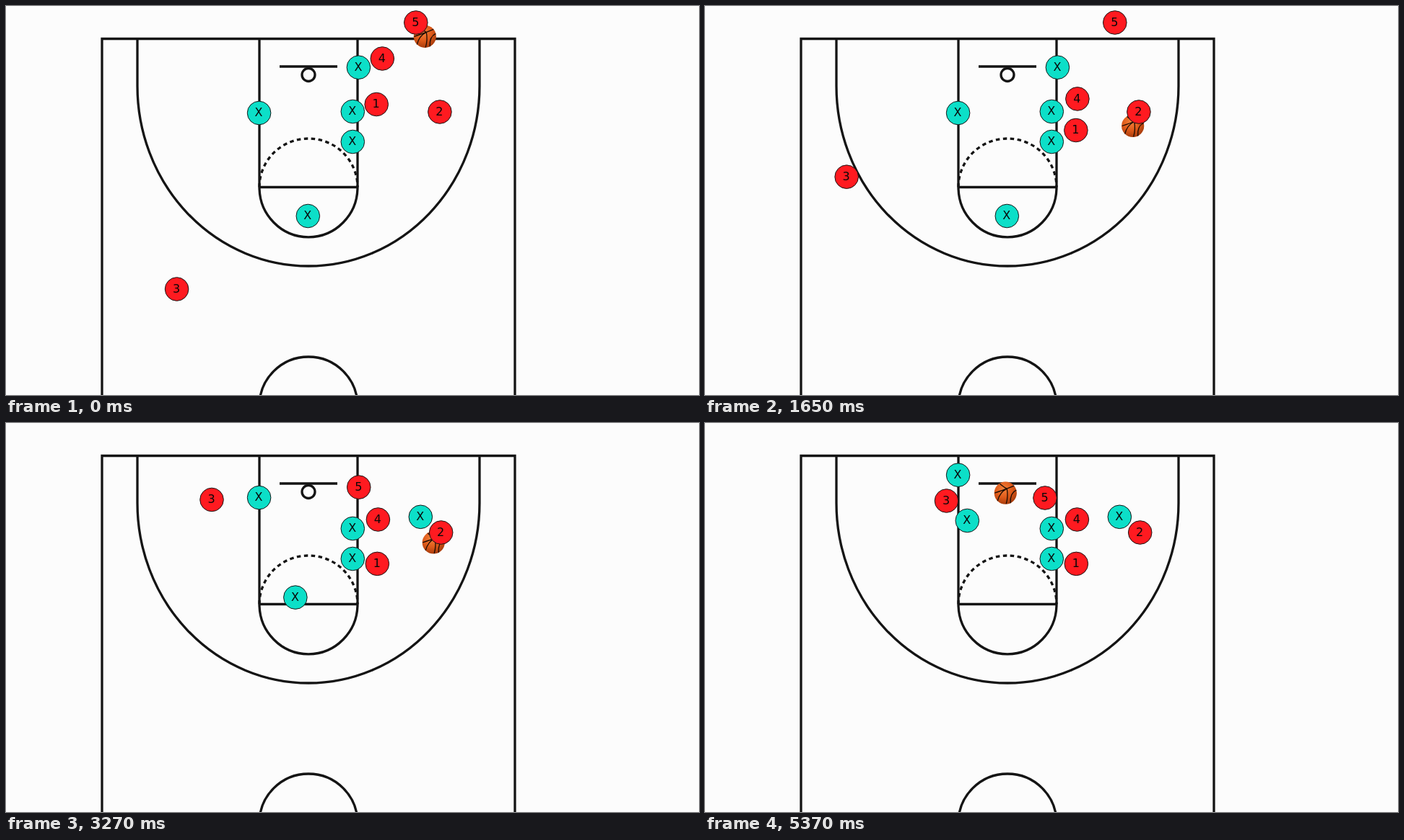
Animation, 960 px wide and 540 px high, one loop 6210 ms. Source, as an HTML page:

```html
<!DOCTYPE html>
<html lang="en">
<head>
<meta charset="utf-8">
<title>Inbound play</title>
<style>
  html, body { margin: 0; width: 100%; height: 100%; overflow: hidden; background: #fcfcfc; }
  svg { display: block; width: 960px; height: 540px; }
  .court { fill: none; stroke: #141414; stroke-width: 3.3; }
  .token { stroke: #151515; stroke-width: 1; }
  .seams { fill: none; stroke: #1c0c04; stroke-width: 1.3; }
  text { font: 16px "DejaVu Sans", Verdana, sans-serif; text-anchor: middle; fill: #080808; }
</style>
</head>
<body>
<svg viewBox="0 0 960 540">
  <defs>
    <radialGradient id="leather" cx="42%" cy="32%" r="68%">
      <stop offset="0" stop-color="#f5823a"/>
      <stop offset=".55" stop-color="#de5a1a"/>
      <stop offset="1" stop-color="#a83c0c"/>
    </radialGradient>
  </defs>
  <g class="court">
    <path d="M133 541V45.5H705V541"/>
    <path d="M182 45.5V111A237 250 0 0 0 656 111V45.5"/>
    <path d="M351 45.5V251.5A68 69.3 0 0 0 487 251.5V45.5M350 251.5H488"/>
    <path d="M351 251.5A68 67.5 0 0 1 487 251.5" stroke-dasharray="5.5 4.5"/>
    <path d="M379 84H459"/>
    <circle cx="419" cy="95.5" r="9"/>
    <circle cx="419" cy="555" r="68"/>
  </g>
  <g id="ball">
    <circle r="15.6" fill="url(#leather)"/>
    <path class="seams" d="M-15 0Q-3 -4 2 -6T12 -10M-8 -13Q-2 -8 2 -6Q4 4 1 15M2 -6Q-8 -1 -11 11M15 -4Q6 0 7 14"/>
  </g>
  <g id="players"></g>
</svg>
<script>
const LOOP = 6210, STEP = 30, LAST = 5370, BEAT = 900;
const layer = document.getElementById("players");
const movers = [];

function make(tag, attrs, parent) {
  const el = document.createElementNS("http://www.w3.org/2000/svg", tag);
  for (const key in attrs) el.setAttribute(key, attrs[key]);
  return parent.appendChild(el);
}

// Something that runs in straight lines at an even pace; durations are in beats.
class Mover {
  constructor(el, x, y) {
    this.el = el;
    this.start = { x, y };
    this.legs = [];
    movers.push(this);
  }
  run(beats, x, y) {
    this.legs.push({ beats, x, y });
    return this;
  }
  wait(beats) {
    const { x, y } = this.legs.at(-1) || this.start;
    return this.run(beats, x, y);
  }
  place(beat) {
    let { x, y } = this.start;
    for (const leg of this.legs) {
      const k = Math.min(Math.max(beat / leg.beats, 0), 1);
      x += (leg.x - x) * k;
      y += (leg.y - y) * k;
      beat -= leg.beats;
    }
    this.el.setAttribute("transform", `translate(${x} ${y})`);
  }
}

function token(label, fill, x, y) {
  const el = make("g", {}, layer);
  make("circle", { class: "token", r: 16.3, fill }, el);
  make("text", { x: -0.5, y: 4.7 }, el).textContent = label;
  return new Mover(el, x, y);
}
const attacker = (label, x, y) => token(label, "#ff1a20", x, y);
const defender = (x, y) => token("X", "#0cdfc8", x, y);

// Defence: two hold the lane, three shift across.
defender(480.3, 146.5);
defender(480.3, 188.5);
defender(488.4, 85.2).wait(2).run(1, 574.3, 130.3);
defender(418.3, 291.5).wait(3).run(2, 363.3, 135.5);
defender(350.6, 148.5).wait(2).run(2, 350.6, 93.5).run(1, 350.6, 72.2);

// Offence: 1 and 4 screen, 3 cuts along the wing, 5 steps in.
attacker("1", 513.2, 136.5).run(3, 514.3, 195.4);
attacker("2", 600.9, 147).wait(2).run(1, 602.7, 152);
attacker("3", 236.6, 393).run(2, 192.5, 223).run(2, 305.8, 80.3).run(1, 334.5, 108);
attacker("4", 521.3, 73).run(2, 515.4, 134);
attacker("5", 567.8, 23).wait(2).run(2, 471, 104);

// Ball: pass in to 2, three beats of handling, pass to 5, shot.
new Mover(document.getElementById("ball"), 580.3, 42.3)
  .run(1, 601, 170)
  .run(1, 591, 165.8).run(1, 598.5, 162.8).run(1, 588.6, 167.8)
  .run(1, 452.8, 108)
  .run(1, 415, 96.8);

const start = performance.now();
function draw() {
  const t = (performance.now() - start) % LOOP;
  const beat = Math.min(Math.floor(t / STEP) * STEP, LAST) / BEAT;
  movers.forEach(mover => mover.place(beat));
  requestAnimationFrame(draw);
}
draw();
</script>
</body>
</html>
```
